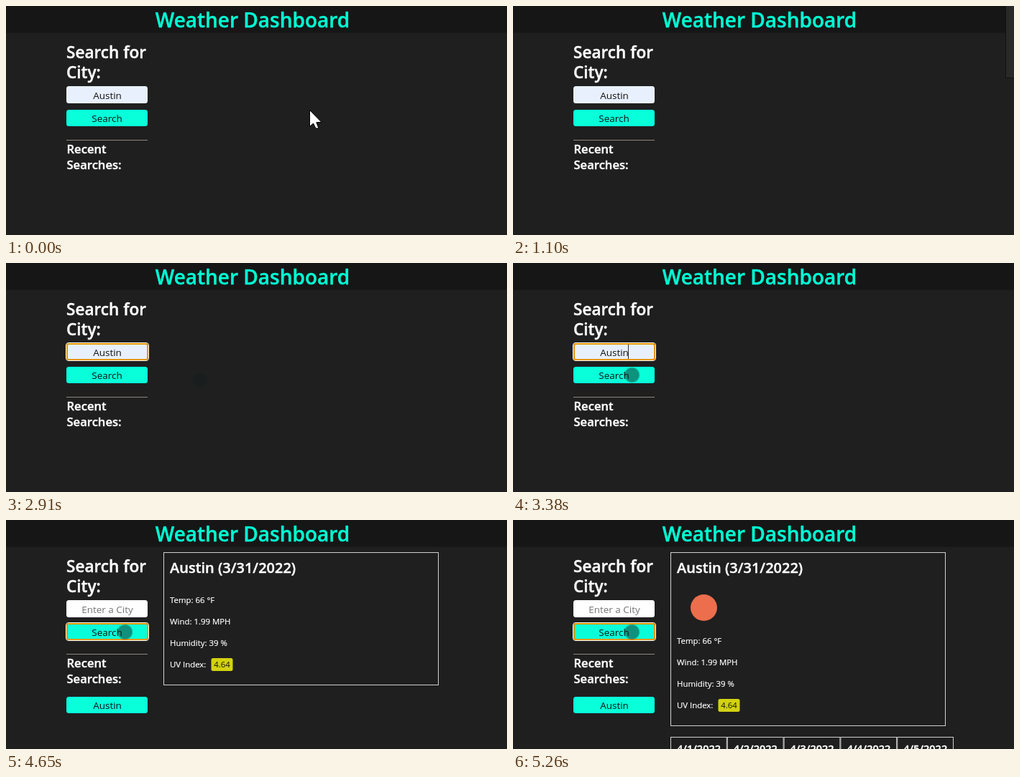
An HTML page that plays this animation: 697 px wide and 320 px high, repeating every 7.46 s.

```html
<!DOCTYPE html>
<html lang="en">
<head>
<meta charset="utf-8">
<title>Weather Dashboard</title>
<style>
  html, body { margin: 0; width: 100%; height: 100%; overflow: hidden; background: #1f1f1f; }
  svg { display: block; font: 13.5px "Open Sans", "Noto Sans", sans-serif; fill: #fff; }
  .head { font-weight: 600; }
  .head text { stroke: #fff; stroke-width: .4; }
  .title { font-size: 28px; fill: #00ffd5; stroke: #00ffd5; stroke-width: .4; text-anchor: middle; }
  .mid { text-anchor: middle; fill: #111; }
  .button { fill: #08ffd9; }
  .small { font-size: 11.4px; }
  .small text:not(.mid) { stroke: #fff; stroke-width: .2; }
  .line { fill: none; stroke: #d0d0d0; }
</style>
</head>
<body>
<svg width="697" height="320" viewBox="0 0 697 320">
  <defs>
    <g id="ring" fill="none">
      <rect x="83.5" y="111.5" width="115" height="25" rx="3.5" stroke="#fff"/>
      <rect x="85" y="113" width="112" height="22" rx="2.5" stroke="#e59700" stroke-width="2"/>
    </g>
    <radialGradient id="soft">
      <stop offset=".8" stop-color="#141c1c" stop-opacity=".48"/>
      <stop offset="1" stop-color="#141c1c" stop-opacity="0"/>
    </radialGradient>
  </defs>

  <rect width="697" height="320" fill="#1f1f1f"/>
  <rect width="697" height="37.5" fill="#161616"/>
  <text class="head title" x="343" y="30">Weather Dashboard</text>

  <g class="head" font-size="22.6">
    <text x="84" y="73">Search for</text>
    <text x="84" y="101">City:</text>
  </g>
  <g data-on="0 3640">
    <rect x="84" y="112" width="113" height="24" rx="3.5" fill="#e8f0fe"/>
    <text class="mid" x="141" y="130">Austin</text>
  </g>
  <g data-on="3640">
    <rect x="84" y="112" width="113" height="24" rx="3.5"/>
    <text class="mid" x="141" y="130" style="fill:#757575">Enter a City</text>
  </g>
  <path d="M160.5 114V134" stroke="#333" data-on="2420 2850"/>
  <path d="M160.5 114V134" stroke="#333" data-on="3380 3640"/>
  <rect class="button" x="84" y="145" width="113" height="23" rx="3.5"/>
  <text class="mid" x="140.5" y="162">Search</text>
  <use href="#ring" data-on="2420 3640"/>
  <use href="#ring" y="32" data-on="3640"/>
  <rect x="84" y="187" width="113" height="1" fill="#8f8780"/>
  <g class="head" font-size="16.6">
    <text x="84.5" y="206">Recent</text>
    <text x="84.5" y="228">Searches:</text>
  </g>
  <g data-on="3700">
    <rect class="button" x="84" y="247" width="113" height="23" rx="3.5"/>
    <text class="mid" x="141" y="264">Austin</text>
  </g>

  <g class="head" data-on="4100">
    <rect class="line" id="card" x="219.5" y="45.5" width="382" height="47"/>
    <text x="228" y="74" font-size="20">Austin (3/31/2022)</text>
  </g>
  <circle cx="265.5" cy="122.5" r="18.5" fill="#ec6e4c" data-on="5190"/>
  <g id="below">
    <g class="small" data-on="4650">
      <text x="228" y="116">Temp: 66 °F</text>
      <text x="228" y="146">Wind: 1.99 MPH</text>
      <text x="228" y="176">Humidity: 39 %</text>
      <text x="228" y="206">UV Index:</text>
      <rect x="285.5" y="193" width="30" height="18" rx="2.5" fill="#d2d210"/>
      <text class="mid" x="300.5" y="206">4.64</text>
    </g>
    <g class="head" id="forecast" font-size="14.5" data-on="4720"></g>
  </g>

  <path d="M685.5 0V100.5H697V0Z" fill="#292929" data-on="140 2350"/>
  <path d="M685.5 0V100.5H697" fill="none" stroke="#121212" data-on="140 2350"/>
  <path id="arrow" d="M.5 .5V23.5L5.5 19 9 26H13L9.8 17.5H17Z" stroke="#000" data-on="0 1100"/>
  <circle id="touch" r="11.5" fill="url(#soft)" data-on="2620"/>
</svg>
<script>
const LOOP = 7460, STEP = 68;
const get = id => document.getElementById(id);
const timed = [...document.querySelectorAll('[data-on]')].map(el => {
  const [from, to = LOOP] = el.dataset.on.split(' ').map(Number);
  return { el, from, to };
});

// Five forecast columns running off the bottom of the stage
for (let day = 1; day <= 5; day++) {
  const x = 219.5 + (day - 1) * 78.8;
  get('forecast').innerHTML +=
    `<rect class="line" x="${x}" y="246.5" width="77.8" height="200"/>` +
    `<text x="${x + 8.5}" y="267.5">4/${day}/2022</text>`;
}

// Each stop is [time, x, y]
const arrowPath = [[0, 422, 145], [340, 352, 137], [748, 194, 148], [816, 191, 149], [1020, 619, 94]];
const touchPath = [[2584, 394, 172], [2856, 270, 164], [3128, 184, 157], [3264, 165.5, 156.5]];

function along(path, t) {
  const i = path.findIndex(stop => stop[0] > t);
  if (i < 0) return path[path.length - 1].slice(1);
  if (i === 0) return path[0].slice(1);
  const a = path[i - 1], b = path[i], k = (t - a[0]) / (b[0] - a[0]);
  return [1, 2].map(n => a[n] + (b[n] - a[n]) * k);
}

const move = (id, [x, y]) => get(id).setAttribute('transform', `translate(${x} ${y})`);

function draw(t) {
  for (const { el, from, to } of timed) el.style.display = t >= from && t < to ? '' : 'none';
  const held = Math.floor(t / STEP) * STEP;
  move('arrow', along(arrowPath, held));
  move('touch', along(touchPath, held));
  move('below', [0, t < 5190 ? 0 : 57]);
  get('card').setAttribute('height', t < 4650 ? 47 : t < 5190 ? 185 : 242);
}

const start = performance.now();
function tick() {
  draw((performance.now() - start) % LOOP);
  requestAnimationFrame(tick);
}
tick();
</script>
</body>
</html>
```
